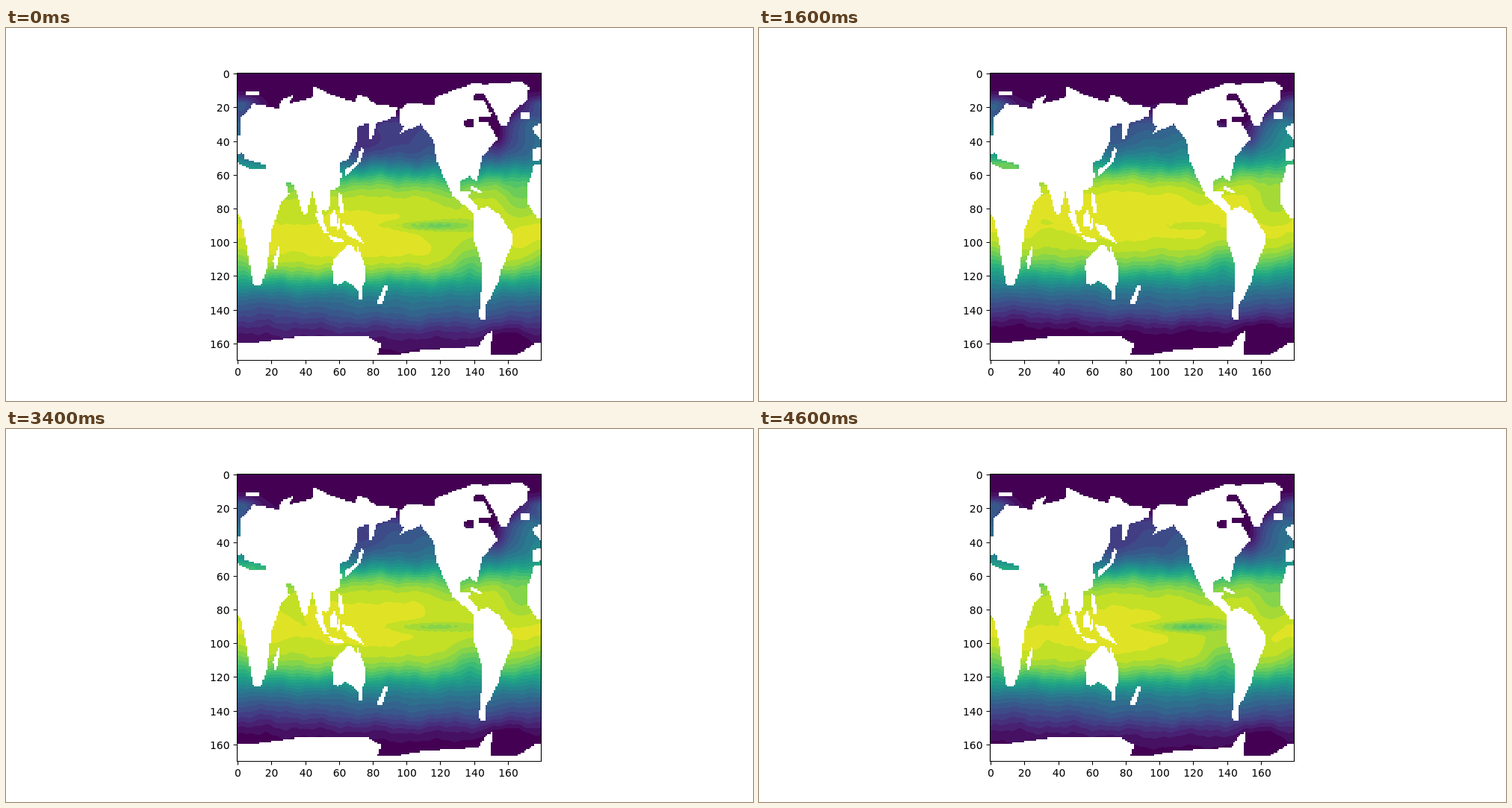
An HTML page with a canvas for the animation above (4.8 s loop, 1000 px wide and 500 px high).

```html
<!DOCTYPE html>
<html lang="en">
<head>
<meta charset="utf-8">
<title>Sea surface temperature</title>
<style>
html, body { margin: 0; width: 100%; height: 100%; overflow: hidden; background: #fff; }
canvas, svg { position: absolute; left: 0; top: 0; }
text { font: 13.89px "DejaVu Sans", sans-serif; }
</style>
</head>
<body>
<canvas id="map" width="1000" height="500"></canvas>
<svg id="axes" width="1000" height="500"></svg>
<script>
const LEFT = 309.5, TOP = 60.5, CELL = 2.2612, COLS = 180, ROWS = 170;
const W = 407, H = 385, X0 = 310, Y0 = 61;
const LAYERS = 22, STEP = 200, LOOP = 4800;

const clamp = (v, lo = 0, hi = 1) => Math.max(lo, Math.min(hi, v));
const mix = (a, b, t) => a + (b - a) * t;
const bell = (v, centre, spread) => Math.exp(-(((v - centre) / spread) ** 2));
const fall = (v, centre, width) => 1 / (1 + Math.exp((v - centre) / width));

function bump(x, y, cx, cy, sx, sy) {
  const dx = (x - cx + 1.5 * W) % W - W / 2; // the map wraps sideways
  return bell(dx, 0, sx) * bell(y, cy, sy);
}

// Coastlines in stage pixels, sampled on the coarse grid.
const grid = document.createElement("canvas");
grid.width = COLS;
grid.height = ROWS;
const pen = grid.getContext("2d");
pen.scale(1 / CELL, 1 / CELL);
pen.translate(-LEFT, -TOP);
const fill = outline => pen.fill(new Path2D(outline));

function drawEurasia() {
  fill("M308 145 315 144 313 122 331 102 366 108 368 97 386 89 378 102 412 93 412 78 433 89 452 95 468 99 470 89 483 93 495 103 524 106 522 118 496 128 490 149 485 150 485 127 470 133 470 152 456 178 447 180 449 198 446 214 433 217 433 238 429 246 422 242 426 260 421 262 410 217 403 250 398 250 385 209 375 207 379 222 360 242 308 242Z");
  const britain = "M718 129 708 130 705 137 718 152Z", iberia = "M718 159 705 163 705 179 718 176Z";
  fill(britain + iberia);
  const iceland = "M689 112h12v9h-12Z", svalbard = "M321 85h19v5h-19Z";
  fill(iceland + svalbard);
  const japan = "M475 159 479 164 474 180 455 199 454 190 470 179Z";
  fill(japan);
}

function drawAfrica() {
  fill("M308 235 368 235 355 272 350 321 342 344 331 345 321 286 314 252 308 250Z");
  const west = "M718 184 707 184 698 213 698 235 711 255 718 255Z";
  fill(west);
  const madagascar = "M359 324 358 312 365 292 367 294 362 323Z";
  fill(madagascar);
}

function drawOceania() {
  const sumatra = "M413 248 420 249 432 276 425 274Z";
  const borneo = "M433 255 441 241 443 266 434 267Z";
  const java = "M429 276 452 284 452 288 436 285Z";
  const philippines = "M445 222h4l4 27h-6Z";
  const sulawesi = "M445 256h4l-3 15h-3Z";
  const newGuinea = "M448 261 463 265 480 290 458 278Z";
  const newZealand = "M506 346 512 346 503 371 498 371 498 365Z";
  for (const island of [sumatra, borneo, java, philippines, sulawesi, newGuinea, newZealand]) fill(island);
  fill("M437 320 440 308 455 293 462 291 469 301 470 291 482 322 481 338 477 347 478 364 473 364 472 353 455 338 444 345 438 343Z");
}

function drawAmericas() {
  fill("M526 110 538 100 573 104 576 92 604 82 628 73 640 76 690 72 700 79 698 96 677 114 671 130 662 131 653 108 645 125 658 150 639 170 630 206 620 199 607 205 607 219 621 218 620 227 632 240 625 247 598 225 577 180 572 150 555 129 526 142 534 131 527 129Z");
  const southern = "M625 246 645 239 660 250 677 274 677 291 662 327 660 340 648 362 641 374 641 391 633 389 637 346 637 315 625 280Z";
  fill(southern);
  const cuba = "M618 210 638 219 636 222 624 217Z";
  fill(cuba);
}

function drawAntarctica() {
  fill("M308 422 335 422 393 413 484 413 502 424 497 439 522 438 556 432 632 427 645 408 651 407 648 439 682 439 710 422 718 422 718 448 308 448Z");
}

function cutInlandSeas() {
  pen.globalCompositeOperation = "destination-out";
  const mediterranean = "M308 170 316 167 320 176 348 183 348 190 328 190 308 179Z";
  const baffinBay = "M627 88 640 89 652 109 648 114 640 98 627 97Z";
  const hudsonBay = "M613 124 627 120 627 132 614 134Z", strait = "M632 120h14v6h-14Z";
  for (const sea of [mediterranean, baffinBay, hudsonBay, strait]) fill(sea);
}

// Yearly mean and seasonal swing by latitude, on the 0..1 colour scale.
const meanAt = lat => lat > 0
  ? .22 * fall(lat, 64, 2) + .73 * fall(lat, 32.7, 5.5)
  : .33 * fall(-lat, 58, 4.5) + .63 * fall(-lat, 31, 5.8);
const swingAt = lat => lat > 0
  ? .11 * bell(lat, 41, 22)
  : -.08 * bell(lat, -28, 15) - .058 * bell(lat, -60, 13);

// Regional departures: strength, centre x, y, spread x, y.
const regions = [
  [-.13, 630, 312, 35, 25], [-.12, 312, 318, 22, 28], [.06, 575, 150, 30, 25],
  [-.06, 478, 150, 22, 20], [.17, 712, 140, 30, 55], [.18, 316, 102, 22, 14],
  [-.25, 628, 122, 32, 20], [-.15, 656, 145, 14, 20], [-.1, 692, 228, 28, 28],
  [-.09, 340, 380, 110, 28], [-.09, 672, 418, 28, 22], [-.08, 590, 205, 22, 25],
  [-.02, 390, 270, 40, 40]
];

// Strength of the equatorial cold tongue: fades mid-loop, returns stronger.
const tongueAt = month => .14 * bell(month, 0, 6) + .2 * bell(month, 21, 5);

const stops = ["440154", "482475", "414487", "355f8d", "2a788e", "21918c", "22a884", "44bf70", "7ad151", "bddf26", "fde725"]
  .map(hex => hex.match(/../g).map(part => parseInt(part, 16)));
const palette = Array.from({ length: LAYERS + 1 }, (_, k) => {
  const p = k / LAYERS * 10, i = Math.min(9, Math.floor(p));
  const [r, g, b] = stops[i].map((v, c) => Math.round(mix(v, stops[i + 1][c], p - i)));
  return 255 << 24 | b << 16 | g << 8 | r;
});

const [mean, swing, tongue] = [0, 0, 0].map(() => new Float32Array(W * H));
const sea = [];

function prepare() {
  drawEurasia();
  drawAfrica();
  drawOceania();
  drawAmericas();
  drawAntarctica();
  cutInlandSeas();
  const mask = pen.getImageData(0, 0, COLS, ROWS).data;
  for (let j = 0; j < H; j++) for (let i = 0; i < W; i++) {
    const x = X0 + i, y = Y0 + j, n = j * W + i;
    const col = Math.min(COLS - 1, Math.floor((x + .5 - LEFT) / CELL));
    const row = Math.min(ROWS - 1, Math.floor((y + .5 - TOP) / CELL));
    if (mask[(row * COLS + col) * 4 + 3] > 127) continue;
    sea.push(n);
    const a = i / W * 2 * Math.PI;
    const wave = 1.6 * Math.sin(5 * a + y * .03) + 1.1 * Math.sin(11 * a - y * .06) + .6 * Math.sin(23 * a + y * .11);
    const lat = 90 - (y + wave - TOP) / CELL;
    const arctic = clamp((y - 80) / 20);
    const inland = bump(x, y, 330, 182, 22, 8);
    let u = meanAt(lat) + .08 * inland;
    for (const [strength, ...place] of regions) u += strength * bump(x, y, ...place);
    mean[n] = u * arctic;
    swing[n] = swingAt(lat) * arctic + .07 * inland;
    const ripple = 1 + .15 * Math.sin(x * .55) * Math.sin(y * .4);
    tongue[n] = bump(x, y, 572, 265, 48, 6) * ripple + .4 * bump(x, y, 612, 268, 62, 32);
  }
}

const ctx = document.getElementById("map").getContext("2d");
const picture = ctx.createImageData(W, H);
const pixels = new Uint32Array(picture.data.buffer).fill(0xffffffff);

function drawMonth(month) {
  const season = Math.cos((month - 7.5) * Math.PI / 6);
  const cold = tongueAt(month);
  for (const n of sea) {
    const x = n % W, y = n / W;
    const drift = .005 * Math.sin(x * .06 + month * 1.7) * Math.sin(y * .08 - month * .9);
    const u = mean[n] + swing[n] * season - tongue[n] * cold + (mean[n] > .05 ? drift : 0);
    pixels[n] = palette[Math.floor(clamp(u) * LAYERS + .5)];
  }
  ctx.putImageData(picture, X0, Y0);
}

function drawAxes() {
  let lines = "M309.5 60.5H716.5V445.5H309.5Z", labels = "";
  for (let v = 0; v <= 160; v += 20) {
    const x = Math.floor(LEFT + (v + .5) * CELL) + .5;
    const y = Math.floor(TOP + (v + .5) * CELL) + .5;
    lines += `M${x} 445.5v5M309.5 ${y}h-5`;
    labels += `<text x="${x}" y="466" text-anchor="middle">${v}</text>`
      + `<text x="299.5" y="${y + 5}" text-anchor="end">${v}</text>`;
  }
  document.getElementById("axes").innerHTML = `<path d="${lines}" fill="none" stroke="#000" stroke-width="1.11"/>${labels}`;
}

let shown = -1;
function tick() {
  const month = Math.floor(performance.now() % LOOP / STEP);
  if (month !== shown) drawMonth(shown = month);
  requestAnimationFrame(tick);
}

prepare();
drawAxes();
tick();
</script>
</body>
</html>
```
